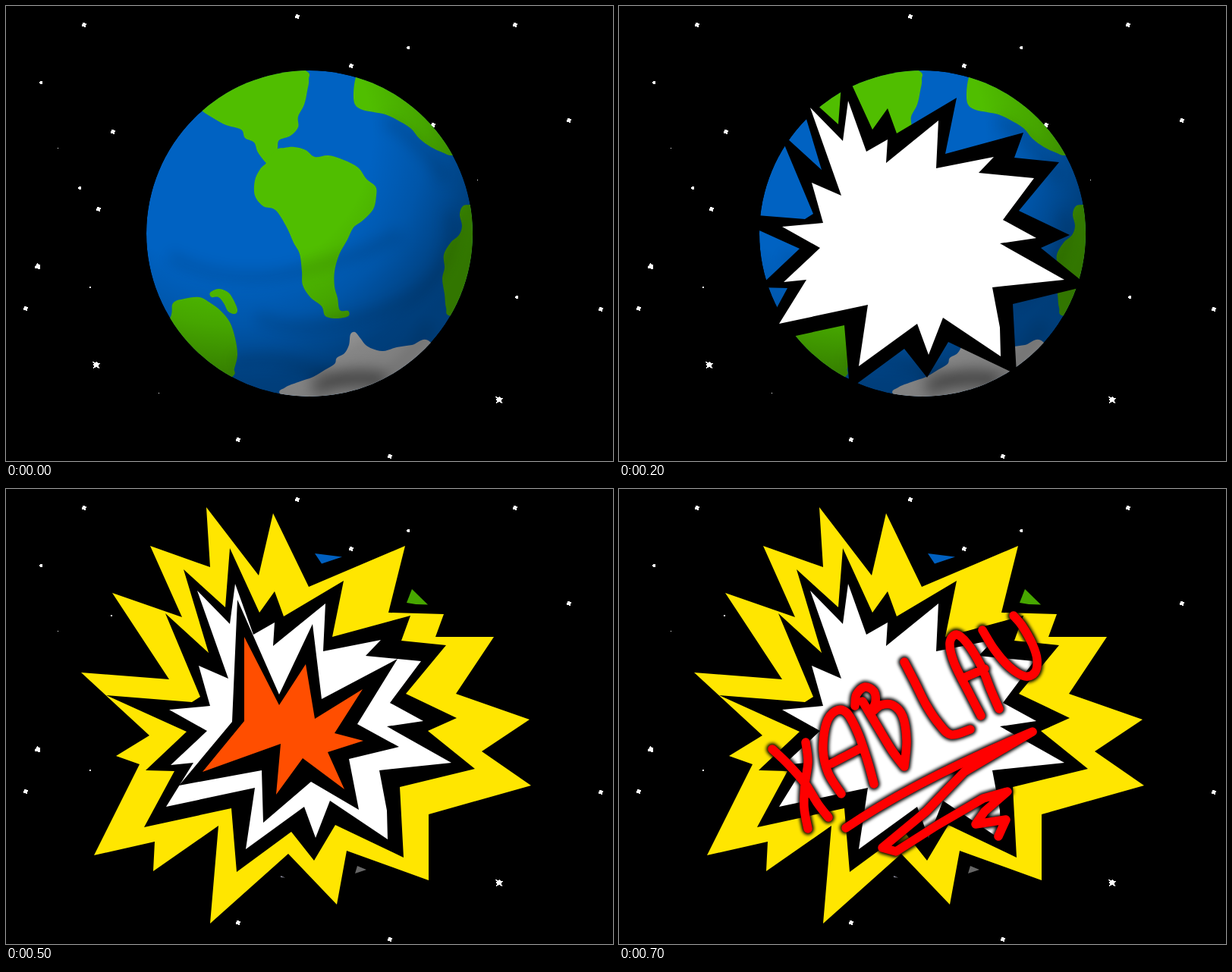
Recreate the animation shown at these times as an HTML page. Size 800x600 px, loop 2300 ms.

```html
<!DOCTYPE html>
<html lang="en">
<head>
<meta charset="utf-8">
<title>Exploding planet</title>
<style>
  html, body { margin: 0; width: 100%; height: 100%; overflow: hidden; background: #000; }
  svg { display: block; width: 100vw; height: 100vh; }
</style>
</head>
<body>
<svg id="stage" viewBox="0 0 800 600">
  <defs>
    <clipPath id="disc"><circle cx="400" cy="300" r="215"/></clipPath>
    <radialGradient id="shade" gradientUnits="userSpaceOnUse" cx="300" cy="170" r="350">
      <stop offset=".52" stop-opacity="0"/>
      <stop offset=".72" stop-opacity=".13"/>
      <stop offset=".93" stop-opacity=".36"/>
      <stop offset="1" stop-opacity=".38"/>
    </radialGradient>
    <filter id="soft" x="-30%" y="-30%" width="160%" height="160%"><feGaussianBlur stdDeviation="9"/></filter>
    <filter id="glow" x="-10%" y="-10%" width="120%" height="120%"><feGaussianBlur stdDeviation="2.2"/></filter>
  </defs>
  <g id="stars" fill="#fff" shape-rendering="crispEdges"></g>
  <g id="hitStars" fill="#fff" shape-rendering="crispEdges"></g>
  <g id="earth" clip-path="url(#disc)">
    <circle cx="400" cy="300" r="215" fill="#0062c2"/>
    <g id="land" fill="#50be00"></g>
    <circle cx="400" cy="300" r="215" fill="url(#shade)"/>
    <g id="streaks" fill="none" stroke="#000" stroke-opacity=".12" stroke-width="16" filter="url(#soft)">
      <path d="M215 330Q290 370 380 350T520 300M330 410Q400 440 500 400T585 270"/>
      <path d="M300 470Q360 455 430 490T560 420M500 150Q550 180 580 230"/>
      <path d="M405 506Q455 480 500 495" stroke-opacity=".4" stroke-width="22"/>
    </g>
  </g>
  <g id="shards">
    <path fill="#0060c0" d="M407 85L443 89.500 416 98.500Z"/>
    <path fill="#47a700" d="M535 132L556 152.500 540 152 528 150Z"/>
    <path fill="#666" d="M463 497L475 502 460 507Z"/>
    <path fill="#889" d="M362 510L368 512.500 362 512Z"/>
    <path fill="#fff" d="M138 166h2v2h-2z"/>
  </g>
  <g id="yellow"></g>
  <g id="white"></g>
  <g id="orange"></g>
  <g id="shout" fill="none" stroke-linecap="round" stroke-linejoin="round"></g>
</svg>
<script>
const LOOP = 2300;
const byId = id => document.getElementById(id);

function add(parent, tag, attrs) {
  const node = document.createElementNS('http://www.w3.org/2000/svg', tag);
  for (const key in attrs) node.setAttribute(key, attrs[key]);
  byId(parent).append(node);
}

const parse = text => text.trim().split(/\s+/).map(pair => pair.split(',').map(Number));

// Catmull-Rom spline through the points.
function smooth(text, closed) {
  const pts = parse(text), n = pts.length;
  const at = i => closed ? pts[(i + n) % n] : pts[Math.max(0, Math.min(n - 1, i))];
  let d = 'M' + pts[0];
  for (let i = 0; i < (closed ? n : n - 1); i++) {
    const [a, b, c, e] = [at(i - 1), at(i), at(i + 1), at(i + 2)];
    const c1 = b.map((v, k) => v + (c[k] - a[k]) / 6);
    const c2 = c.map((v, k) => v - (e[k] - b[k]) / 6);
    d += `C${c1} ${c2} ${c}`;
  }
  return d + (closed ? 'Z' : '');
}

// Stars
const shapes = {
  dot: '0,-1 1,-1 1,0 0,0',
  dash: '-1,-1 1,-1 1,1 -1,1',
  small: '-1,-2 1,-2 2,-1 2,1 1,2 -1,2 -2,1 -2,-1',
  medium: '-2,-3 3,-2 2,3 -3,2',
  lump: '-1,-4 1,-2 3,-2 3,4 -4,3 -4,0 -2,-1',
  big: '-5,-4 -1,-3 1,-5 2,-2 5,-2 3,1 4,5 0,3 -4,5 -3,1 -6,0 -3,-1'
};
function scatter(group, shape, places) {
  for (const [x, y] of parse(places))
    add(group, 'polygon', { points: shapes[shape], transform: `translate(${x} ${y})` });
}
scatter('stars', 'medium', '103,25 384,14 671,25 455,79 742,151 26,399 784,400 306,572 506,594');
scatter('stars', 'small', '530,55 46,101');
scatter('stars', 'dash', '111,371');
scatter('stars', 'dot', '68,188');
scatter('stars', 'lump', '42,343');
scatter('stars', 'big', '650,519');
scatter('hitStars', 'medium', '141,166 122,268 563,157');
scatter('hitStars', 'small', '97,240 673,384');
scatter('hitStars', 'dot', '621,230 201,511');
scatter('hitStars', 'big', '119,473');

// Continents; points beyond the disc are clipped away.
const green = [
  `258,138 275,149 290,157 310,163 315,174 327,180 332,193 343,207 348,207 356,195
   358,187 360,177 375,171 385,160 385,146 393,130 397,112 399,97 393,84 330,60 240,120`,
  `343,207 355,190 367,187 380,186 395,190 407,199 425,197 445,203 464,213 475,228 487,238
   488,250 484,268 470,283 458,292 450,308 439,328 433,350 433,370 437,385 440,401 451,402
   451,409 436,412 421,409 416,396 401,384 391,368 390,350 387,327 379,312 369,290 355,269
   339,264 328,250 328,230 335,215`,
  `461,94 458,115 460,130 470,137 485,140 500,143 515,150 533,161 545,175 560,186 575,193
   589,197 615,190 560,90 470,75`,
  `613,262 602,264 598,275 601,290 597,302 586,312 577,328 578,345 575,360 578,380 580,398
   587,409 640,410 640,262`,
  `216,412 220,392 235,386 255,384 270,392 283,402 295,417 302,438 305,460 301,478 297,490
   250,520 190,450`,
  '269,378 280,373 292,377 299,386 305,400 302,406 293,403 287,392 280,384 271,384'
];
green.forEach(outline => add('land', 'path', { d: smooth(outline, true) }));
add('land', 'path', { fill: '#d0d0d0', d: smooth(
  `362,513 368,503 385,496 405,489 420,480 433,472 436,464 446,458 452,447 454,433 460,430
   467,438 474,447 483,452 497,455 515,450 535,447 559,443 590,500 400,545`, true) });

// Bursts
const burst = (id, fill, points) => add(id, 'polygon', { fill, points });
burst('yellow', '#ffe600',
  `264,24 333,114 352,32 399,129 526,75 504,163 577,165 566,195 643,195 593,270 690,304
   627,346 692,391 557,429 557,516 449,477 436,548 372,481 269,573 280,444 194,504 196,465
   116,483 176,363 145,352 189,325 99,242 215,251 140,137 232,169 190,75 269,103`);
burst('white', '#000',
  `234,106 289,156 295,78 334,163 354,135 366,168 445,121 430,195 533,167 521,200 580,206
   527,270 594,302 556,319 618,369 519,393 524,486 434,443 406,490 376,452 304,505 297,421
   182,446 222,372 184,371 238,320 132,272 245,281 256,274 210,164 267,216`);
burst('white', '#fff',
  `252,134 295,178 302,125 326,192 354,176 352,207 421,151 418,214 494,199 474,220 547,227
   506,282 550,306 502,313 587,361 492,371 502,424 503,462 427,411 408,460 393,419 316,475
   328,394 211,419 247,361 217,364 265,319 215,291 269,286 254,233 293,250`);
burst('orange', '#000',
  `305,146 360,271 404,178 416,277 516,224 463,310 518,340 452,356 465,423 402,386 339,440
   337,371 228,391 298,307`);
burst('orange', '#ff4e00',
  `314,195 360,285 395,231 407,303 470,264 433,322 471,332 424,347 446,396 391,355 356,403
   362,336 259,373 314,306`);

// Brush lettering
const lettering = [
  '202,343 222,362 245,388 262,415 276,433',
  '246,334 249,360 245,390 244,420 249,448',
  '293,402 276,375 269,345 273,310 285,293 300,295 315,322 328,360 336,389',
  '280,362 299,352 318,342',
  '311,286 313,271 324,261 336,267 338,281 333,294 345,285 361,285 374,300 379,332 376,366',
  '321,280 340,312 360,345 376,366',
  '376,228 390,255 405,285 422,310 438,324 463,317',
  '477,299 462,270 442,230 436,203 445,192 460,205 478,235 490,265 501,290',
  '452,250 482,237',
  '479,186 495,212 515,235 535,247 548,242 551,225 545,205 531,180 520,167'
].map(line => smooth(line)).join('') +
  'M299 447Q390 385 545 320L455 373 405 425 347 473 365 478 420 443 480 408 512 399' +
  ' 482 425 470 442 510 436 500 458';
add('shout', 'path', { d: lettering, stroke: '#000', 'stroke-width': 16, filter: 'url(#glow)' });
add('shout', 'path', { d: lettering, stroke: '#f00', 'stroke-width': 11.5 });

// Visible spans of each layer, in ms.
const spans = {
  earth: [[0, 300]],
  hitStars: [[0, 300]],
  shards: [[300, LOOP]],
  yellow: [[300, LOOP]],
  white: [[200, 300], [400, LOOP]],
  orange: [[100, 200], [500, 600]],
  shout: [[700, LOOP]]
};
const layers = Object.entries(spans).map(([id, times]) => [byId(id), times]);

const start = performance.now();
function draw() {
  const t = (performance.now() - start) % LOOP;
  for (const [node, times] of layers)
    node.style.display = times.some(([from, to]) => t >= from && t < to) ? '' : 'none';
  requestAnimationFrame(draw);
}
draw();
</script>
</body>
</html>
```
